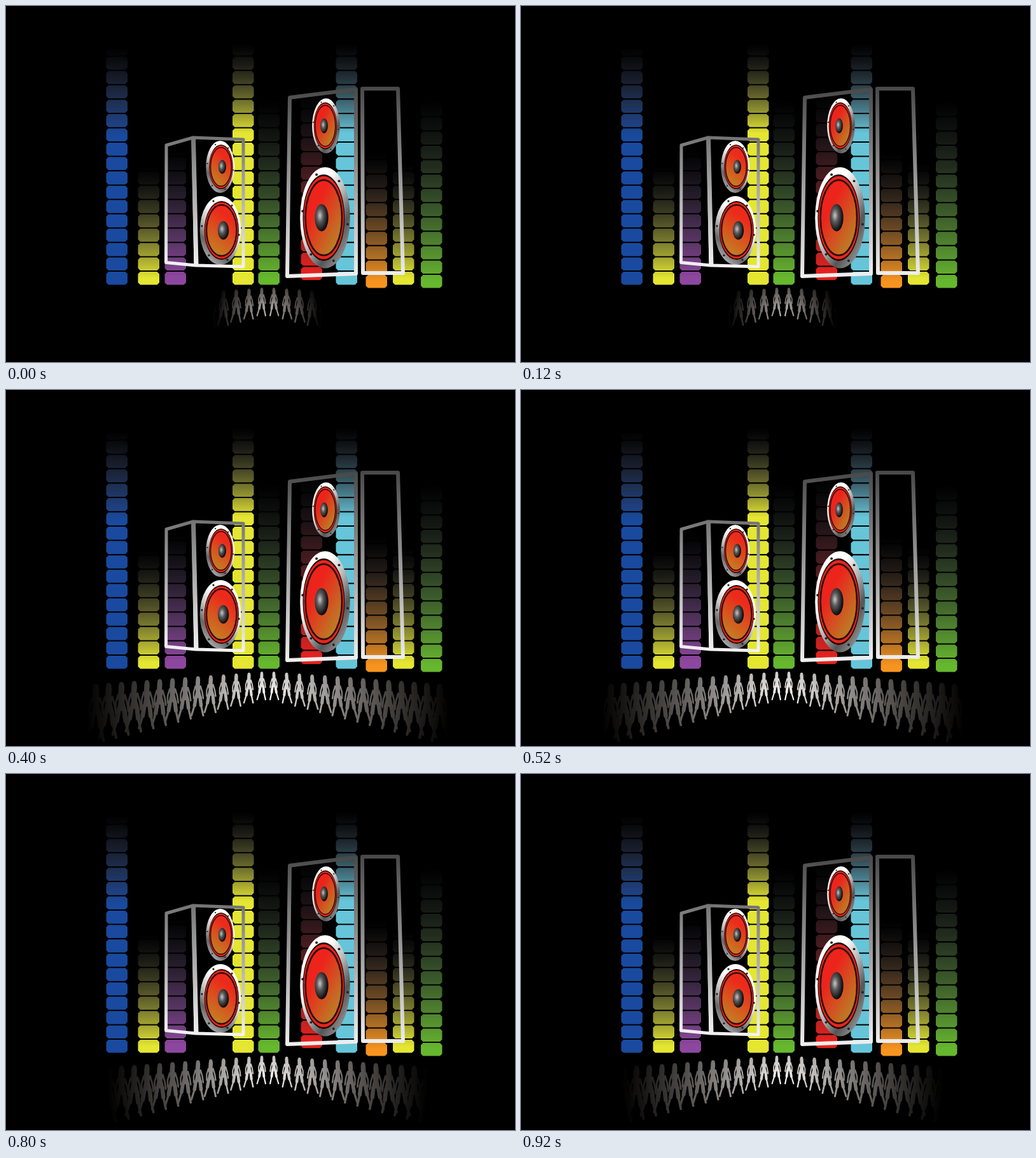
An HTML page that plays this animation: 800 px wide and 560 px high, repeating every 1 s.

```html
<!DOCTYPE html>
<html lang="en">
<head>
<meta charset="utf-8">
<title>Speakers and equalizer</title>
<style>
  html, body { margin: 0; width: 100%; height: 100%; overflow: hidden; background: #000; }
  svg { display: block; width: 800px; height: 560px; }
  .state { animation: 1s step-end infinite; }
  #barsA { animation-name: even; }
  #barsB { animation-name: odd; }
  #crew0 { animation-name: near; }
  #crew1 { animation-name: wide; }
  #crew2 { animation-name: full; }
  #crew3 { animation-name: back; }
  @keyframes even { 0%, 40%, 80%, 100% { opacity: 1 } 20%, 60% { opacity: 0 } }
  @keyframes odd  { 0%, 40%, 80%, 100% { opacity: 0 } 20%, 60% { opacity: 1 } }
  @keyframes near { 0% { opacity: 1 } 40%, 100% { opacity: 0 } }
  @keyframes wide { 0%, 60%, 100% { opacity: 0 } 40% { opacity: 1 } }
  @keyframes full { 0%, 80%, 100% { opacity: 0 } 60% { opacity: 1 } }
  @keyframes back { 0% { opacity: 0 } 80%, 100% { opacity: 1 } }
</style>
</head>
<body>
<svg viewBox="0 0 800 560">
  <defs id="fades"></defs>
  <defs>
    <linearGradient id="rimL" x1=".75" y1=".05" x2=".25" y2=".95">
      <stop offset=".3" stop-color="#fff"/><stop offset=".55" stop-color="#c4c4c4"/>
      <stop offset=".8" stop-color="#666"/><stop offset="1" stop-color="#aaa"/>
    </linearGradient>
    <linearGradient id="rimR" x1=".2" y1=".1" x2=".85" y2=".85">
      <stop offset=".25" stop-color="#fff"/><stop offset=".55" stop-color="#b0b0b0"/>
      <stop offset=".8" stop-color="#555"/><stop offset="1" stop-color="#888"/>
    </linearGradient>
    <linearGradient id="coneL" x1=".7" y1=".1" x2=".35" y2=".95">
      <stop offset=".15" stop-color="#ec2a1c"/><stop offset="1" stop-color="#c47c22"/>
    </linearGradient>
    <linearGradient id="coneR" x1=".2" y1=".2" x2=".8" y2=".85">
      <stop offset=".2" stop-color="#ec241c"/><stop offset="1" stop-color="#bd7a24"/>
    </linearGradient>
    <radialGradient id="cap" cx=".38" cy=".42" r=".6">
      <stop offset="0" stop-color="#c8c8c8"/><stop offset=".4" stop-color="#5a5a5a"/>
      <stop offset="1" stop-color="#080808"/>
    </radialGradient>
    <linearGradient id="steelL" gradientUnits="userSpaceOnUse" x1="0" y1="205" x2="0" y2="410">
      <stop offset="0" stop-color="#747474"/><stop offset="1" stop-color="#f2f2f2"/>
    </linearGradient>
    <linearGradient id="steelR" gradientUnits="userSpaceOnUse" x1="0" y1="128" x2="0" y2="425">
      <stop offset="0" stop-color="#484848"/><stop offset="1" stop-color="#efefef"/>
    </linearGradient>
    <!-- one dancer, 92 units tall, head at x = 0 -->
    <g id="dancer" fill="#fff" stroke="#fff" stroke-linecap="round" stroke-linejoin="round">
      <ellipse cy="6" rx="4.5" ry="6" stroke="none"/>
      <path d="M0 9L-.5 19" stroke-width="10"/>
      <path d="M-7 21L7 21L5 34L9 50L-8 50L-5 34Z" stroke="none"/>
      <path d="M-5 49L-8 67M5 49L7 67" stroke-width="8"/>
      <path d="M-8 67L-15 90M7 67L12 90" stroke-width="4.5"/>
      <path d="M-6 23L-10 37L-10 51M6 23L10 37L12 51" fill="none" stroke-width="3.4"/>
    </g>
    <mask id="row" maskUnits="userSpaceOnUse" x="0" y="430" width="800" height="130"></mask>
  </defs>
  <g id="barsA" class="state"></g>
  <g id="barsB" class="state"></g>
  <g id="speakers"></g>
  <g fill="none" stroke-linejoin="round">
    <g stroke="url(#steelL)" stroke-width="5">
      <path d="M252 219L294 207L298 408L251.5 403.5Z"/>
      <path d="M295 207L373 210L373 410L299 408Z"/>
      <path d="M294.5 208L299 407" stroke-width="7"/>
    </g>
    <g stroke="url(#steelR)" stroke-width="6">
      <path d="M446 144L550 131L550 421L442 425Z"/>
      <path d="M560 130L616 130L624 420L561 420Z"/>
    </g>
  </g>
  <g id="crew"></g>
</svg>
<script>
const add = (id, markup) => document.getElementById(id).insertAdjacentHTML('beforeend', markup);

// Equalizer: x, bottom, colour, top of the stack in states A and B
const YELLOW = '#e4e632', GREEN = '#66b82e', PITCH = 22.55;
const columns = [
  [157.5, 438.5, '#194a9f', 66, 218],
  [207.5, 438.5, YELLOW, 252, 105],
  [249.5, 438.5, '#8e479f', 228, 80],
  [356, 438.5, YELLOW, 60, 192],
  [396.5, 438.5, GREEN, 150, 78],
  [463.5, 431, '#e8211d', 138, 335],
  [518.5, 438.5, '#66c5d9', 60, 188],
  [565.5, 443.5, '#f7941e', 232, 120],
  [608, 438.5, YELLOW, 248, 108],
  [652, 443.5, GREEN, 148, 75]
];

function stack(x, bottom) {
  let d = '';
  for (let y = bottom - 20.5; y > 55; y -= PITCH) {
    d += `M${x + 3.5} ${y}h26.5l3.5 3.5v13.5l-3.5 3.5h-26.5l-3.5 -3.5v-13.5z`;
  }
  return d;
}

columns.forEach(([x, bottom, color, ...tops], i) => {
  const d = stack(x, bottom);
  tops.forEach((top, s) => {
    const name = 'AB'[s];
    const end = top < 130 ? top + 140 : bottom - 10; // tall stacks reach full colour early
    add('fades', `<linearGradient id="bar${name}${i}" gradientUnits="userSpaceOnUse"
      x1="0" x2="0" y1="${top}" y2="${end}"><stop offset="0" stop-color="#556" stop-opacity="0"/>
      <stop offset="1" stop-color="${color}"/></linearGradient>`);
    add('bars' + name, `<path d="${d}" fill="url(#bar${name}${i})"/>`);
  });
});

// Speakers: everything inside follows from the rim ellipse
function speaker(side, cx, cy, rx, ry) {
  const turn = side === 'L' ? 1 : -1;
  const oval = (shift, kx, ky, attrs) =>
    `<ellipse cx="${cx + turn * shift * rx}" cy="${cy}" rx="${rx * kx}" ry="${ry * ky}" ${attrs}/>`;
  const cone = (k, attrs) => oval(.055, .84 * k, .855 * k, attrs);
  let out = oval(0, 1, 1, `fill="url(#rim${side})"`);
  for (let i = 0; i < 6; i++) {
    const a = (i * 60 + 8) * Math.PI / 180;
    out += `<circle cx="${cx + Math.cos(a) * rx * .91}" cy="${cy + Math.sin(a) * ry * .92}" r="${rx / 20}" fill="#222"/>`;
  }
  add('speakers', out +
    cone(1, 'fill="#260705"') +
    cone(.96, 'fill="#e8271c"') +
    cone(.87, `fill="url(#cone${side})" stroke="#2a0805" stroke-width="${rx / 15}"`) +
    oval(.14, .27, .27, 'fill="url(#cap)"'));
}

speaker('L', 336.7, 253, 22.5, 41);
speaker('L', 337, 353, 32.3, 54);
speaker('R', 503, 188.5, 21.8, 43.3);
speaker('R', 501.5, 333, 39.3, 79.5);

// Dancers grow outwards from the middle, mirrored on the right
for (let i = 0; i < 14; i++) {
  const gap = 9.5 + i * 20.05, top = 443 + i * 1.46, size = (45 + i * 3.6) / 92;
  for (const side of [-1, 1]) {
    add('row', `<use href="#dancer" transform="translate(${411.5 + side * gap} ${top}) scale(${-side * size} ${size})"/>`);
  }
}

// Spotlight on the dancers: centre x, radius, colour
[[411, 86, '#c6c1be'], [412, 288, '#fff'], [398, 500, '#fff'], [411, 252, '#fff']]
  .forEach(([cx, r, color], i) => {
    add('fades', `<radialGradient id="spot${i}" gradientUnits="userSpaceOnUse" cx="${cx}" cy="488" r="${r}">
      <stop offset="0" stop-color="${color}"/><stop offset="1" stop-color="#b3a498" stop-opacity="0"/></radialGradient>`);
    add('crew', `<g id="crew${i}" class="state"><rect y="430" width="800" height="130" fill="url(#spot${i})" mask="url(#row)"/></g>`);
  });
</script>
</body>
</html>
```
